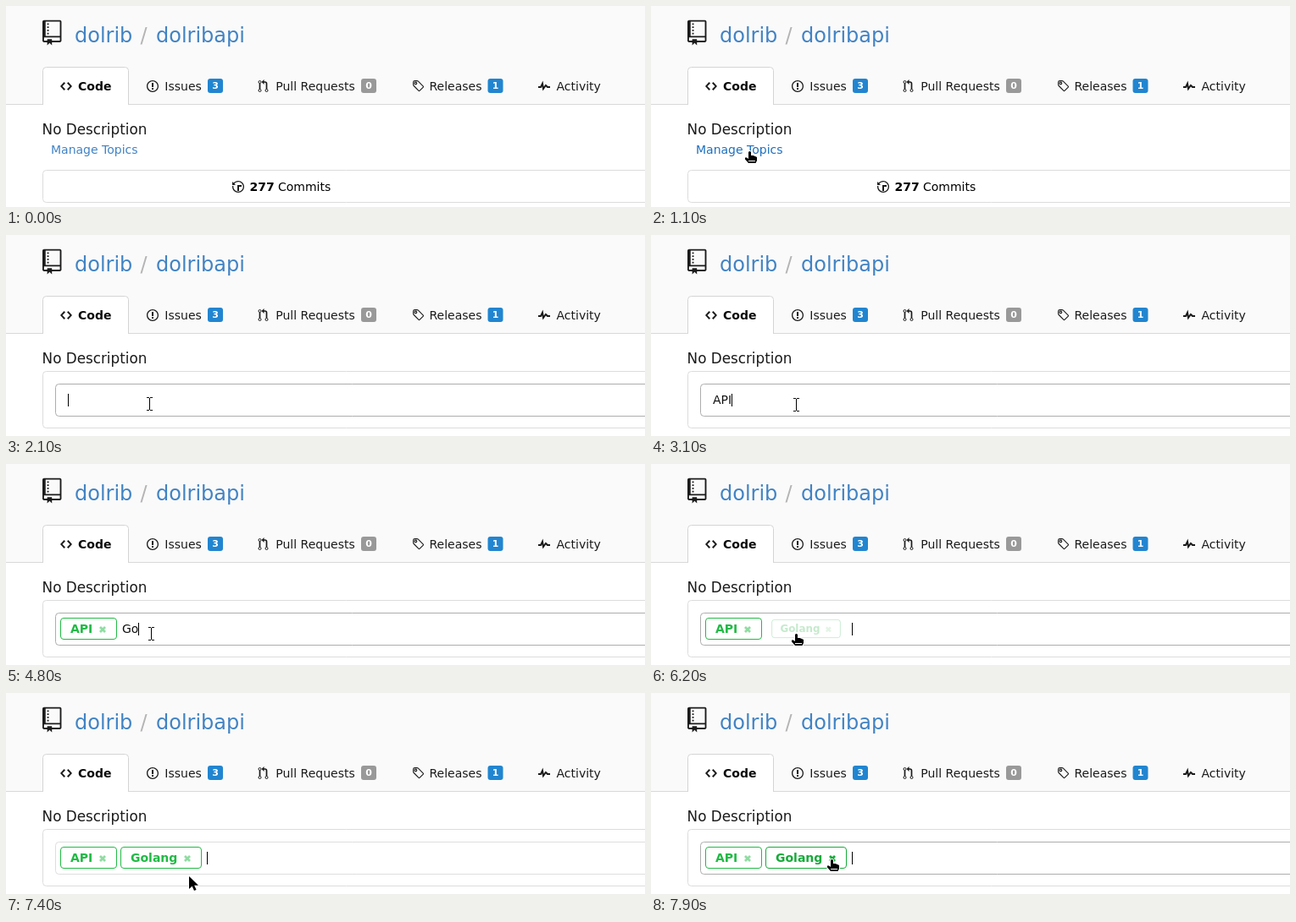
These frames come from a looping animation (754x238 px, 8000 ms). An HTML page with a canvas:

```html
<!DOCTYPE html>
<html lang="en">
<head>
<meta charset="utf-8">
<title>Manage topics</title>
<style>
html, body { margin: 0; width: 100%; height: 100%; overflow: hidden; background: #fff; }
canvas { display: block; width: 754px; height: 238px; }
</style>
</head>
<body>
<canvas id="stage"></canvas>
<script>
const W = 754, H = 238, LOOP = 8000, STEP = 100;
const canvas = document.getElementById('stage');
const ctx = canvas.getContext('2d');
const dpr = window.devicePixelRatio || 1;
canvas.width = W * dpr;
canvas.height = H * dpr;

const INK = '#1b1b1b', LINK = '#4183c4', LINK_HOVER = '#1e70bf';
const GREEN = '#21ba45', GREEN_HOVER = '#16ab39';

const icons = {
  repo: new Path2D('M4 9H3V8h1v1zm0-3H3v1h1V6zm0-2H3v1h1V4zm0-2H3v1h1V2zm8-1v12c0 .55-.45 1-1 1H6v2l-1.5-1.5L3 16v-2H1c-.55 0-1-.45-1-1V1c0-.55.45-1 1-1h10c.55 0 1 .45 1 1zm-1 10H1v2h2v-1h3v1h5v-2zm0-10H2v9h9V1z'),
  code: new Path2D('M9.5 3L8 4.5 11.5 8 8 11.5 9.5 13 14 8 9.5 3zm-5 0L0 8l4.5 5L6 11.5 2.5 8 6 4.5 4.5 3z'),
  issue: new Path2D('M7 2.3c3.14 0 5.7 2.56 5.7 5.7s-2.56 5.7-5.7 5.7A5.71 5.71 0 0 1 1.3 8c0-3.14 2.56-5.7 5.7-5.7zM7 1C3.14 1 0 4.14 0 8s3.14 7 7 7 7-3.14 7-7-3.14-7-7-7zm1 3H6v5h2V4zm0 6H6v2h2v-2z'),
  pulse: new Path2D('M11.5 8L8.8 5.4 6.6 8.5 5.5 1.6 2.38 8H0v2h3.6l.9-1.8.9 5.4L9 8.5l1.6 1.5H14V8h-2.5z'),
  history: new Path2D('M8 13H6V6h5v2H8v5zM7 1C4.81 1 2.87 2.02 1.59 3.59L0 2v4h4L2.5 4.5C3.55 3.17 5.17 2.3 7 2.3c3.14 0 5.7 2.56 5.7 5.7s-2.56 5.7-5.7 5.7A5.71 5.71 0 0 1 1.3 8c0-.34.03-.67.09-1H.08C.03 7.33 0 7.66 0 8c0 3.86 3.14 7 7 7s7-3.14 7-7-3.14-7-7-7z'),
  pullLines: new Path2D('M2 4.5v7M10 11.5V5Q10 3 8 3H6.5'),
  pullHead: new Path2D('M7 0v6L4 3z'),
  tag: new Path2D('M1.6 3.5Q1.6 1.6 3.5 1.6H6Q6.8 1.6 7.4 2.2L13.3 8.1Q13.8 8.6 13.3 9.1L9 13.4Q8.5 13.8 8 13.3L2.2 7.5Q1.6 6.9 1.6 6Z')
};

const pointers = {
  arrow: new Path2D('M0 0V15L3.6 11.7 6 17 8.6 15.9 6.2 10.8H11Z'),
  hand: new Path2D('M-1 1Q.5-1 2 1V5H4.5L7 6 9 7V11L7.5 14H-1L-5 9.5V7.5H-3L-1 9Z')
};

// Pointer track: [ms, x, y]
const track = [
  [200, 134, 234], [500, 130, 213], [800, 120, 182], [1000, 117, 174], [1100, 116, 172],
  [1200, 116, 173], [1300, 117, 180], [1400, 119, 188], [1900, 158, 194], [2100, 169, 200],
  [2200, 171, 201], [6700, 171, 201], [6900, 183, 200], [7100, 204, 212], [7300, 214, 222],
  [7400, 216, 217], [7600, 216, 203], [7700, 216, 197], [7800, 216, 197], [7900, 213, 197]
];

// Typed text: [ms, value]
const typing = [
  [0, ''], [2600, 'A'], [2900, 'AP'], [3100, 'API'], [3700, ''], [4600, 'G'], [4800, 'Go'],
  [5000, 'Gol'], [5200, 'Gola'], [5300, 'Golan'], [5400, 'Golang'], [6200, '']
];

const caretOn = [[2100, 3700], [3800, 4400], [4600, 6000], [6200, 6800], [7400, LOOP]];

const tags = [
  { name: 'API', start: 3700, x: 64, w: 67 },
  { name: 'Golang', start: 6200, x: 135, w: 96 }
];

function text(s, x, y, size = 14, color = INK, weight = 'normal') {
  ctx.font = `${weight} ${size}px "DejaVu Sans", sans-serif`;
  ctx.fillStyle = color;
  ctx.fillText(s, x, y);
}

function box(x, y, w, h, stroke, fill, r = 4) {
  ctx.beginPath();
  ctx.roundRect(x + .5, y + .5, w - 1, h - 1, r);
  if (fill) { ctx.fillStyle = fill; ctx.fill(); }
  if (stroke) { ctx.strokeStyle = stroke; ctx.lineWidth = 1; ctx.stroke(); }
}

function at(x, y, draw, scale = 1) {
  ctx.save();
  ctx.translate(x, y);
  ctx.scale(scale, scale);
  ctx.fillStyle = ctx.strokeStyle = INK;
  draw();
  ctx.restore();
}

function icon(name, x, y, scale = 1) {
  at(x, y, () => ctx.fill(icons[name]), scale);
}

function ring(x, y, r) {
  ctx.beginPath();
  ctx.arc(x, y, r, 0, Math.PI * 2);
  ctx.stroke();
}

function badge(s, x, color) {
  ctx.beginPath();
  ctx.roundRect(x, 86, 18, 17, 3);
  ctx.fillStyle = color;
  ctx.fill();
  text(s, x + 5.2, 98, 11, '#fff', 'bold');
}

function drawHeader() {
  ctx.fillStyle = '#fafafa';
  ctx.fillRect(0, 0, W, 116);
  ctx.fillStyle = '#d8d8d9';
  ctx.fillRect(0, 116, W, 1);

  icon('repo', 43, 16.7, 1.87);
  text('dolrib', 81, 43, 24, LINK);
  text('/', 158.5, 43, 24, '#b4b4b4');
  text('dolribapi', 177, 43, 24, LINK);

  ctx.beginPath();
  ctx.roundRect(43.5, 72.5, 101, 48, 4);
  ctx.save();
  ctx.clip();
  ctx.fillStyle = '#fff';
  ctx.fillRect(43, 72, 102, 45);
  ctx.restore();
  ctx.save();
  ctx.beginPath();
  ctx.rect(43, 72, 102, 45);
  ctx.clip();
  box(43, 72, 102, 56, '#d4d4d5');
  ctx.restore();

  icon('code', 64, 87);
  text('Code', 85, 100, 14, '#0d0d0d', 'bold');
  icon('issue', 166, 87);
  text('Issues', 187.3, 100);
  badge('3', 238, '#2185d0');
  at(297.5, 87, () => {
    ctx.lineWidth = 1.7;
    ctx.stroke(icons.pullLines);
    ctx.fill(icons.pullHead);
    ctx.lineWidth = 1;
    ring(2, 3, 1.5);
    ring(2, 13, 1.5);
    ring(10, 13, 1.5);
  });
  text('Pull Requests', 318.3, 100);
  badge('0', 419, '#999');
  at(479, 87, () => {
    ctx.lineWidth = 1.1;
    ctx.stroke(icons.tag);
    ring(4.4, 4.4, 1.3);
  });
  text('Releases', 499.5, 100);
  badge('1', 568.5, '#2185d0');
  icon('pulse', 628, 87);
  text('Activity', 649.5, 100);

  text('No Description', 42.6, 152, 16.8);
}

function drawView(hover) {
  text('Manage Topics', 53, 175, 14, hover ? LINK_HOVER : LINK);
  box(43, 194, W, 39, '#dcdcdd', '#fff');
  icon('history', 267, 206);
  text('277', 287.4, 219, 14, '#000', 'bold');
  text('Commits', 321, 219, 14, '#000');
}

function drawTag(tag, t, p) {
  const k = Math.min(1, (t - tag.start + STEP) / 400);
  const over = inside(p, tag.x, 182, tag.w, 26);
  const color = over ? GREEN_HOVER : GREEN;
  const cx = tag.x + tag.w / 2;
  const closeX = tag.x + tag.w - 17;
  ctx.save();
  ctx.globalAlpha = k;
  ctx.translate(cx, 195);
  ctx.scale(.8 + .2 * k, .8 + .2 * k);
  ctx.translate(-cx, -195);
  box(tag.x, 182, tag.w, 26, color, '#fff', 3.5);
  text(tag.name, tag.x + 12, 200, 14, color, 'bold');
  ctx.globalAlpha = k * (inside(p, closeX - 5, 189, 10, 12) ? 1 : .5);
  ctx.strokeStyle = color;
  ctx.lineWidth = 2.8;
  ctx.beginPath();
  ctx.moveTo(closeX - 3, 193);
  ctx.lineTo(closeX + 3, 199);
  ctx.moveTo(closeX + 3, 193);
  ctx.lineTo(closeX - 3, 199);
  ctx.stroke();
  ctx.restore();
}

function drawEditor(t, p) {
  box(43, 161, W, 68, '#dcdcdd', '#fff');
  box(58, 176, W, 39, inside(p, 58, 176, W, 39) ? '#adadae' : '#dedede', '#fff');
  let x = 73;
  for (const tag of tags) {
    if (t < tag.start) continue;
    drawTag(tag, t, p);
    x = tag.x + tag.w + 6;
  }
  const value = typing.filter(k => k[0] <= t).pop()[1];
  text(value, x, 200, 14, '#111');
  if (caretOn.some(([a, b]) => t >= a && t < b)) {
    ctx.fillStyle = '#000';
    ctx.fillRect(Math.floor(x + ctx.measureText(value).width), 188, 1, 15);
  }
}

function inside(p, x, y, w, h) {
  return !!p && p.x >= x && p.x < x + w && p.y >= y && p.y < y + h;
}

function pointerAt(t) {
  if (t < track[0][0]) return null;
  const i = track.findIndex(k => k[0] > t);
  if (i < 0) {
    const [, x, y] = track[track.length - 1];
    return { x, y };
  }
  const [t0, x0, y0] = track[i - 1], [t1, x1, y1] = track[i];
  const k = (t - t0) / (t1 - t0);
  return { x: Math.round(x0 + (x1 - x0) * k), y: Math.round(y0 + (y1 - y0) * k) };
}

function drawBeam() {
  ctx.fillStyle = '#fff';
  ctx.fillRect(-4, -8, 8, 3);
  ctx.fillRect(-1, -8, 3, 17);
  ctx.fillRect(-4, 6, 8, 3);
  ctx.fillStyle = '#000';
  ctx.fillRect(-3, -8, 3, 1);
  ctx.fillRect(1, -8, 3, 1);
  ctx.fillRect(0, -7, 1, 14);
  ctx.fillRect(-3, 7, 3, 1);
  ctx.fillRect(1, 7, 3, 1);
}

function drawPointer(p, kind) {
  at(p.x, p.y, () => {
    if (kind === 'beam') return drawBeam();
    ctx.lineJoin = 'round';
    ctx.lineWidth = 2;
    ctx.strokeStyle = '#fff';
    ctx.stroke(pointers[kind]);
    ctx.fillStyle = '#000';
    ctx.fill(pointers[kind]);
    if (kind === 'hand') {
      ctx.fillStyle = '#fff';
      ctx.fillRect(-1, 11, 8, 1);
    }
  });
}

function render(t) {
  ctx.setTransform(dpr, 0, 0, dpr, 0, 0);
  ctx.fillStyle = '#fff';
  ctx.fillRect(0, 0, W, H);
  drawHeader();

  const p = pointerAt(t);
  let kind = 'arrow';
  if (t < 1300) {
    const hover = inside(p, 53, 163, 103, 16);
    if (hover) kind = 'hand';
    drawView(hover);
  } else {
    drawEditor(t, p);
    if (inside(p, 58, 176, W, 39)) kind = 'beam';
    if (tags.some(g => t >= g.start && inside(p, g.x, 182, g.w, 26))) kind = 'hand';
  }
  if (p) drawPointer(p, kind);
}

const begin = performance.now();
function tick() {
  const t = (performance.now() - begin) % LOOP;
  render(Math.floor(t / STEP) * STEP);
  requestAnimationFrame(tick);
}
tick();
</script>
</body>
</html>
```
